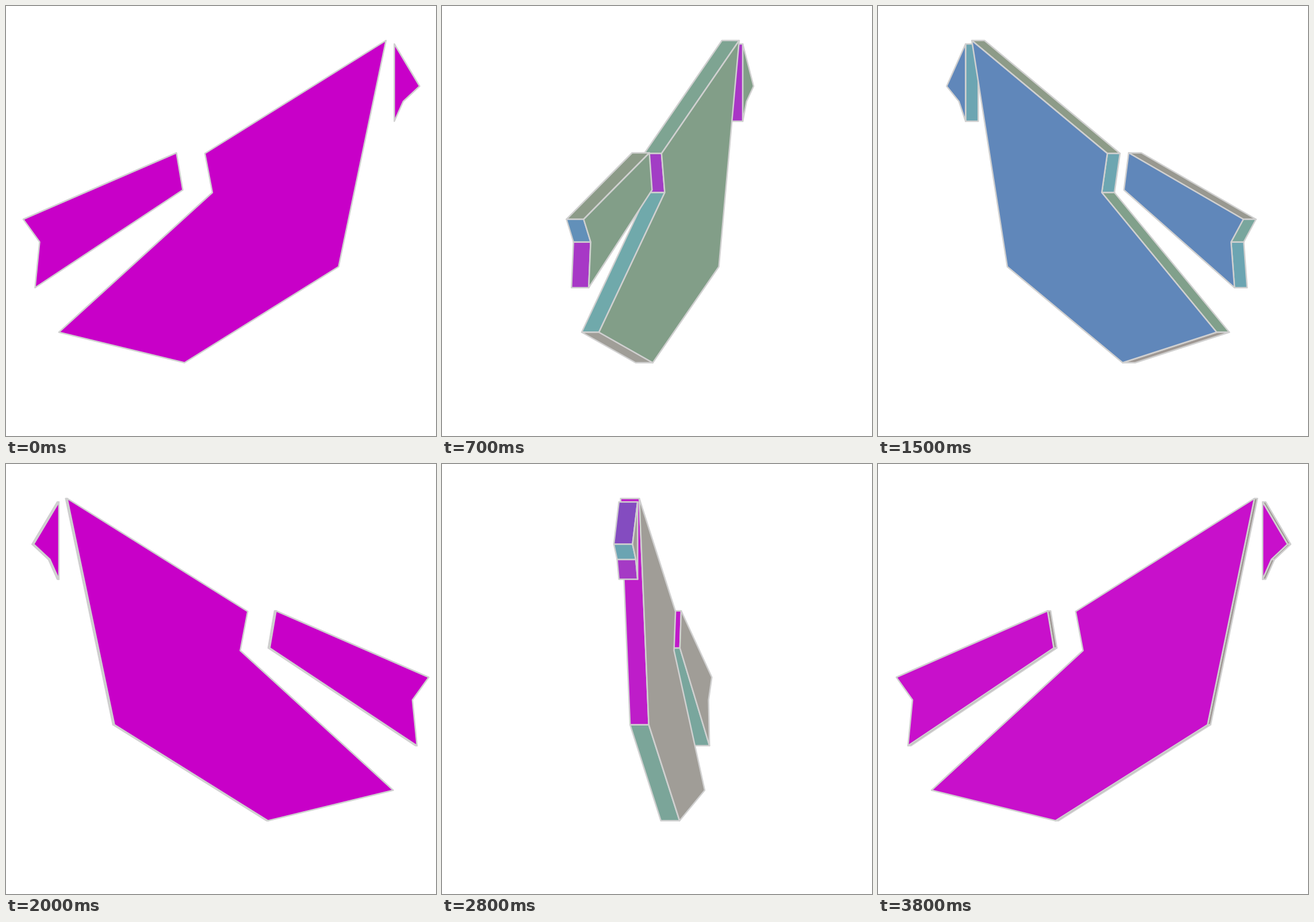
Recreate the animation shown at these times as an HTML page with a canvas. Size 748 px wide and 748 px high, loop 3.9 s.

```html
<!DOCTYPE html>
<html lang="en">
<head>
<meta charset="utf-8">
<title>Rotating prisms</title>
<style>
  html, body { margin: 0; width: 100%; height: 100%; overflow: hidden; background: #fff; }
  canvas { display: block; width: 748px; height: 748px; }
</style>
</head>
<body>
<canvas id="stage" width="748" height="748"></canvas>
<script>
const ctx = document.getElementById('stage').getContext('2d');
const STEPS = 39, STEP_MS = 100;
const AXIS = 382.6, HALF_DEPTH = 16.6;

// Outlines run clockwise, ordered from left to right.
const pieces = [
  [[30, 371], [296.5, 255.5], [307.5, 320], [50.5, 490], [58.5, 410.5]],
  [[661, 60], [578.5, 453.5], [310.5, 620.5], [92, 567.5], [359, 324.5], [346, 256.5]],
  [[675.5, 66], [719.5, 139.5], [691, 166], [675.5, 200.5]]
];

// Fill colour by how squarely a face looks at the viewer.
const ramp = [
  [0, 'a09a96'], [0.157, '9f9893'], [0.213, 'a09e98'], [0.263, '989890'],
  [0.354, '8d9b88'], [0.43, '829e88'], [0.479, '7ea492'], [0.539, '79a69d'],
  [0.608, '70a9ab'], [0.663, '6ca5b2'], [0.733, '6290b9'], [0.7485, '6087ba'],
  [0.774, '5976bb'], [0.817, '7553be'], [0.89, 'a43cc5'], [0.987, 'c810cb'],
  [0.996, 'c800c8'], [1, 'c800c8']
].map(([at, hex]) => [at, hex.match(/../g).map(h => parseInt(h, 16))]);

function shade(facing) {
  const v = Math.min(1, Math.abs(facing));
  const i = Math.max(1, ramp.findIndex(([at]) => at >= v));
  const [a, from] = ramp[i - 1], [b, to] = ramp[i];
  const k = (v - a) / (b - a);
  return `rgb(${from.map((c, n) => Math.round(c + (to[n] - c) * k))})`;
}

function fillFace(points, color) {
  ctx.beginPath();
  points.forEach(([x, y]) => ctx.lineTo(x, y));
  ctx.closePath();
  ctx.fillStyle = color;
  ctx.fill();
  ctx.stroke();
}

function drawPiece(outline, sin, cos) {
  const nearZ = cos > 0 ? HALF_DEPTH : -HALF_DEPTH;
  const project = ([x, y], z) => [AXIS + (x - AXIS) * cos + z * sin, y];

  outline
    .map((p, i) => [p, outline[(i + 1) % outline.length]])
    .map(([p, q]) => ({
      p, q,
      facing: -(q[1] - p[1]) / Math.hypot(q[0] - p[0], q[1] - p[1]) * sin,
      distance: (p[0] + q[0]) * sin
    }))
    .filter(side => side.facing > 1e-6)
    .sort((a, b) => b.distance - a.distance)
    .forEach(({ p, q, facing }) => fillFace(
      [project(p, nearZ), project(q, nearZ), project(q, -nearZ), project(p, -nearZ)],
      shade(facing)));

  fillFace(outline.map(p => project(p, nearZ)), shade(cos));
}

function draw(step) {
  const angle = step / STEPS * 2 * Math.PI;
  const sin = Math.sin(angle), cos = Math.cos(angle);
  ctx.clearRect(0, 0, 748, 748);
  ctx.lineWidth = 2.5;
  ctx.lineJoin = 'round';
  ctx.strokeStyle = '#d0d0d0';
  const order = sin > 0 ? [...pieces].reverse() : pieces;
  order.forEach(piece => drawPiece(piece, sin, cos));
}

const start = performance.now();
function tick() {
  draw(Math.floor((performance.now() - start) / STEP_MS) % STEPS);
  requestAnimationFrame(tick);
}
tick();
</script>
</body>
</html>
```
